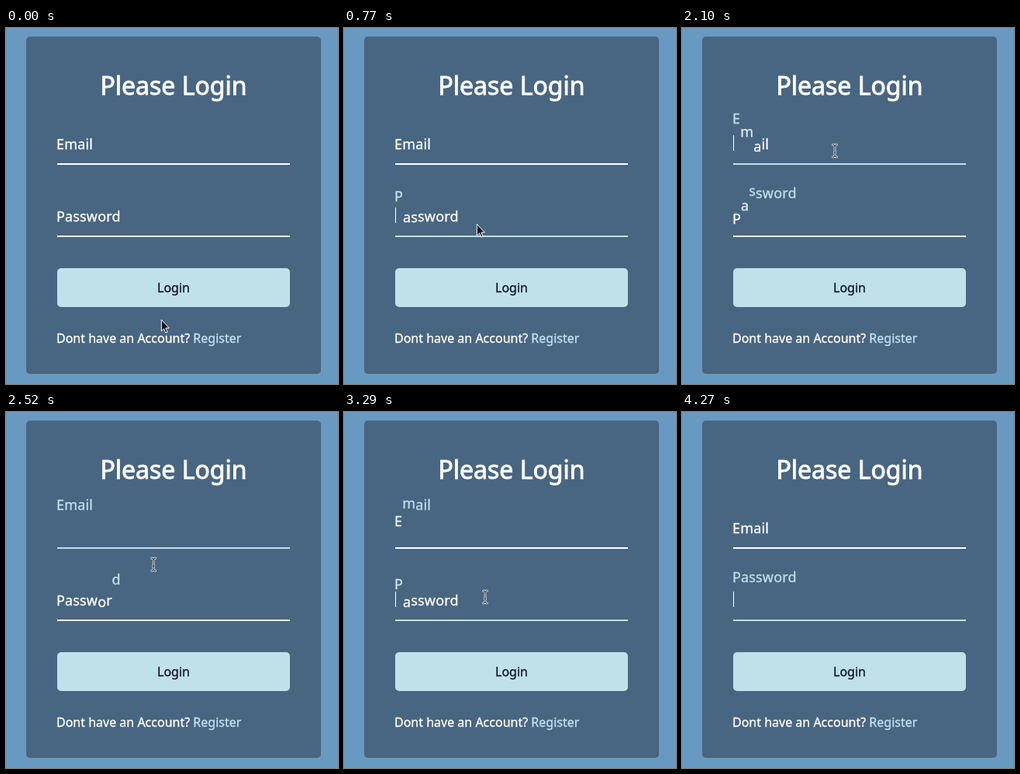
Recreate the animation shown at these times as an HTML page. Size 428 by 458 pixels, loop 4410 ms.

```html
<!DOCTYPE html>
<html lang="en">
<head>
<meta charset="utf-8">
<title>Login form</title>
<style>
html, body { margin: 0; width: 100%; height: 100%; overflow: hidden; background: #6899c0; }
svg { display: block; width: 100vw; height: 100vh; }
text { font-family: "Noto Sans", "Open Sans", sans-serif; font-size: 16px; fill: #fff; stroke-width: .3px; }
.title { font-size: 32px; stroke: #fff; stroke-width: .9px; }
.label { font-size: 18px; letter-spacing: .15px; }
.note { stroke: #fff; }
.button { fill: #0c1722; stroke: #0c1722; }
.link { fill: #c3e3f2; stroke: #c3e3f2; }
</style>
</head>
<body>
<svg viewBox="0 0 428 458">
  <rect width="428" height="458" fill="#6899c0"/>
  <rect x="26" y="11" width="380" height="434" rx="5" fill="#486681"/>
  <text class="title" x="216" y="85.7" text-anchor="middle">Please Login</text>
  <g id="fields"></g>
  <rect x="66" y="309" width="300" height="50" rx="5" fill="#c0e0ea"/>
  <text class="button" x="216" y="340" text-anchor="middle">Login</text>
  <text class="note" x="65" y="405">Dont have an Account? <tspan class="link">Register</tspan></text>
  <g id="cursor">
    <path id="arrow" d="M.3.3V15L3.6 11.9L5.8 17.2L8.1 16.2L5.9 11H10.4Z" fill="#0c1420" stroke="#fff" stroke-width="1" stroke-linejoin="round"/>
    <g id="beam" fill="none">
      <path id="stem" d="M-3.5-8H-1.5L0-6.5L1.5-8H3.5M0-6.5V6.5M-1.8 2H1.8M-3.5 8H-1.5L0 6.5L1.5 8H3.5" stroke="#fff" stroke-width="2.6"/>
      <use href="#stem" style="display:none"/>
      <path d="M-3-8H-1.5L0-6.5L1.5-8H3M0-6.5V6.5M-1.5 2H1.5M-3 8H-1.5L0 6.5L1.5 8H3" stroke="#22303f" stroke-width="1.1"/>
    </g>
  </g>
</svg>
<script>
const LOOP = 4410, RISE = 30, SPAN = 300, STAGGER = 75, BLINK = 530;
const WHITE = [255, 255, 255], PALE = [192, 224, 234];
const $ = id => document.getElementById(id);

function add(tag, parent, attrs) {
  const el = document.createElementNS("http://www.w3.org/2000/svg", tag);
  for (const k in attrs) el.setAttribute(k, attrs[k]);
  return parent.appendChild(el);
}

const clamp = v => Math.min(1, Math.max(0, v));
const lerp = (a, b, k) => a + (b - a) * k;
const smooth = k => k * k * (3 - 2 * k);
const mix = k => `rgb(${WHITE.map((c, i) => Math.round(lerp(c, PALE[i], clamp(k))))})`;

// cubic-bezier(.68, -.55, .265, 1.55)
const curve = (a, b, s) => 3 * (1 - s) ** 2 * s * a + 3 * (1 - s) * s * s * b + s ** 3;
function backEase(x) {
  if (x <= 0) return 0;
  if (x >= 1) return 1;
  let lo = 0, hi = 1;
  for (let i = 0; i < 24; i++) {
    const mid = (lo + hi) / 2;
    if (curve(.68, .265, mid) < x) lo = mid; else hi = mid;
  }
  return curve(-.55, 1.55, lo);
}

function field(word, base, toggles) {
  const g = $("fields");
  const text = add("text", g, { class: "label", x: 65, y: base });
  const letters = [...word].map(ch => {
    const el = add("tspan", text, {});
    el.textContent = ch;
    return el;
  });
  const line = add("rect", g, { x: 66, y: base + 18, width: 300, height: 2 });
  const caret = add("rect", g, { x: 66, y: base - 18, width: 1, height: 20, fill: "#fff" });
  return { letters, line, caret, toggles };
}

// toggles: times at which focus is gained, lost, gained...
const fields = [
  field("Email", 156, [1880, 3135]),
  field("Password", 249, [600, 1880, 3135])
];

function drawField({ letters, line, caret, toggles }, t) {
  const past = toggles.filter(at => at <= t);
  const focused = past.length % 2 === 1;
  const since = t - (past.length ? past[past.length - 1] : -LOOP);
  let prev = 0;
  letters.forEach((el, i) => {
    const k = backEase((since - i * STAGGER) / SPAN);
    const up = focused ? k : 1 - k;
    const y = -RISE * up, color = mix(up);
    el.setAttribute("dy", (y - prev).toFixed(3));
    el.style.fill = el.style.stroke = color;
    prev = y;
  });
  line.setAttribute("fill", mix(focused ? 1 : 0));
  caret.style.display = focused && since % (2 * BLINK) < BLINK ? "" : "none";
}

// time, x, y
const path = [
  [0, 200, 375], [70, 200, 375], [500, 171, 252], [1150, 171, 252],
  [1450, 198, 156], [1650, 198, 156], [1850, 197, 158], [2250, 197, 158],
  [2800, 183, 236], [3050, 183, 236], [3200, 182, 238], [3820, 182, 238],
  [4080, 206, 475], [LOOP, 206, 475]
];

function drawCursor(t) {
  const i = path.findIndex(p => p[0] > t);
  const a = path[i - 1], b = path[i];
  const k = smooth((t - a[0]) / (b[0] - a[0]));
  const x = lerp(a[1], b[1], k), y = lerp(a[2], b[2], k);
  const beam = t > 1300 && y < 268;
  $("cursor").setAttribute("transform", `translate(${x.toFixed(2)} ${y.toFixed(2)})`);
  $("beam").style.display = beam ? "" : "none";
  $("arrow").style.display = beam ? "none" : "";
}

function draw(t) {
  fields.forEach(f => drawField(f, t));
  drawCursor(t);
}

const start = performance.now();
function tick(now) {
  draw(Math.max(0, now - start) % LOOP);
  requestAnimationFrame(tick);
}
draw(0);
requestAnimationFrame(tick);
</script>
</body>
</html>
```
